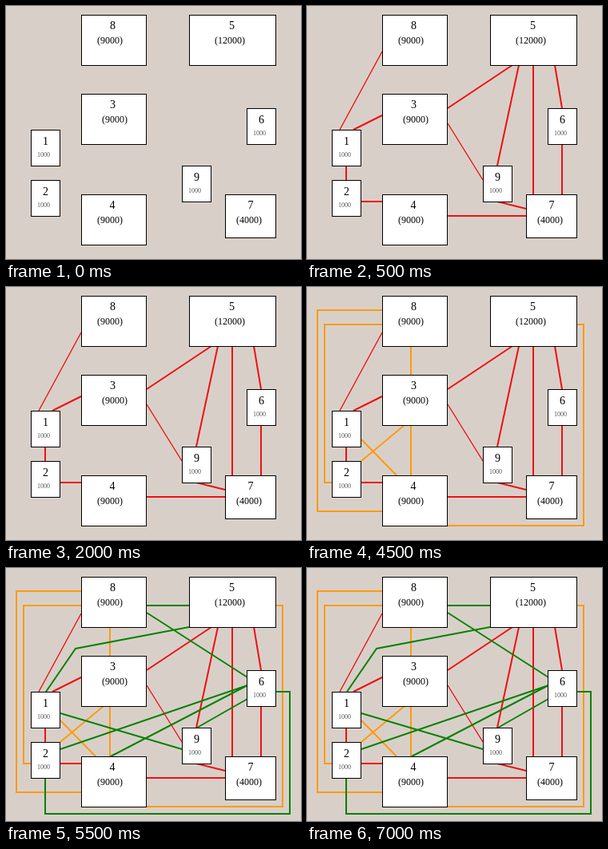
Write an HTML page that moves like this. It is 369x317 px and loops after 8 s.

```html
<!DOCTYPE html>
<html lang="en">
<head>
<meta charset="utf-8">
<title>Network links</title>
<style>
  html, body { margin: 0; width: 100%; height: 100%; overflow: hidden; background: #d8d0c8; }
  svg { display: block; width: 369px; height: 317px; }
  path { fill: none; stroke-width: 2; }
  rect { fill: #fff; stroke: #000; }
  text { font: 14px "Liberation Serif", "Times New Roman", serif; text-anchor: middle; }
  .big { font-size: 12px; }
  .small { font-size: 8px; fill: #555; }
</style>
</head>
<body>
<svg viewBox="0 0 369 317">
  <g id="links">
    <g stroke="#f00f14" data-start="500">
      <path d="M94 57L41 155M176 147L220 218" style="stroke-width:1.4"/>
      <path d="M94 137L58 155M257 74L176 128M265 74L238 200M283 74V236M310 74L319 128
               M319 173V236M238 245L274 254M176 263H274M68 245H94M49 200V218"/>
    </g>
    <g stroke="#ff9a10" data-start="3000">
      <path d="M94 29H13V281H94M94 47H22V245H31M130 74V110M130 173V236
               M122 173L68 218M68 191L112 236M337 47H346V299H176"/>
    </g>
    <g stroke="#0a800a" data-start="5500">
      <path d="M176 47H229M176 56L302 137M229 74L87 101L50 155M68 182L220 227
               M302 147L68 227M302 147L131 236M302 164L239 200M337 155H355V308H49V263"/>
    </g>
  </g>
  <g id="nodes"></g>
</svg>
<script>
const LOOP = 8000;
const links = [...document.querySelectorAll('#links > g')];

// Each label offset is relative to the box's top-left corner.
function node(id, value, x, y, w, h, idX, valueX) {
  const small = value === '1000';
  return `<rect x="${x + .5}" y="${y + .5}" width="${w}" height="${h}"/>
    <text x="${x + idX}" y="${y + (small ? 19 : 18)}">${id}</text>
    <text class="${small ? 'small' : 'big'}" x="${x + valueX}" y="${y + (small ? 34 : 36)}">${value}</text>`;
}
const smallNode = (id, x, y) => node(id, '1000', x, y, 36, 45, 18.5, 16);

document.getElementById('nodes').innerHTML = [
  node(8, '(9000)', 94, 11, 81, 63, 39.5, 36),
  node(5, '(12000)', 229, 11, 108, 63, 53.5, 51),
  node(3, '(9000)', 94, 110, 81, 63, 39.5, 42),
  node(4, '(9000)', 94, 236, 81, 63, 39, 36),
  node(7, '(4000)', 274, 236, 63, 54, 32, 30),
  smallNode(1, 31, 155),
  smallNode(2, 31, 218),
  smallNode(6, 301, 128),
  smallNode(9, 220, 200)
].join('');

function draw() {
  const t = performance.now() % LOOP;
  for (const group of links)
    group.style.display = t >= +group.dataset.start ? '' : 'none';
  requestAnimationFrame(draw);
}
draw();
</script>
</body>
</html>
```
